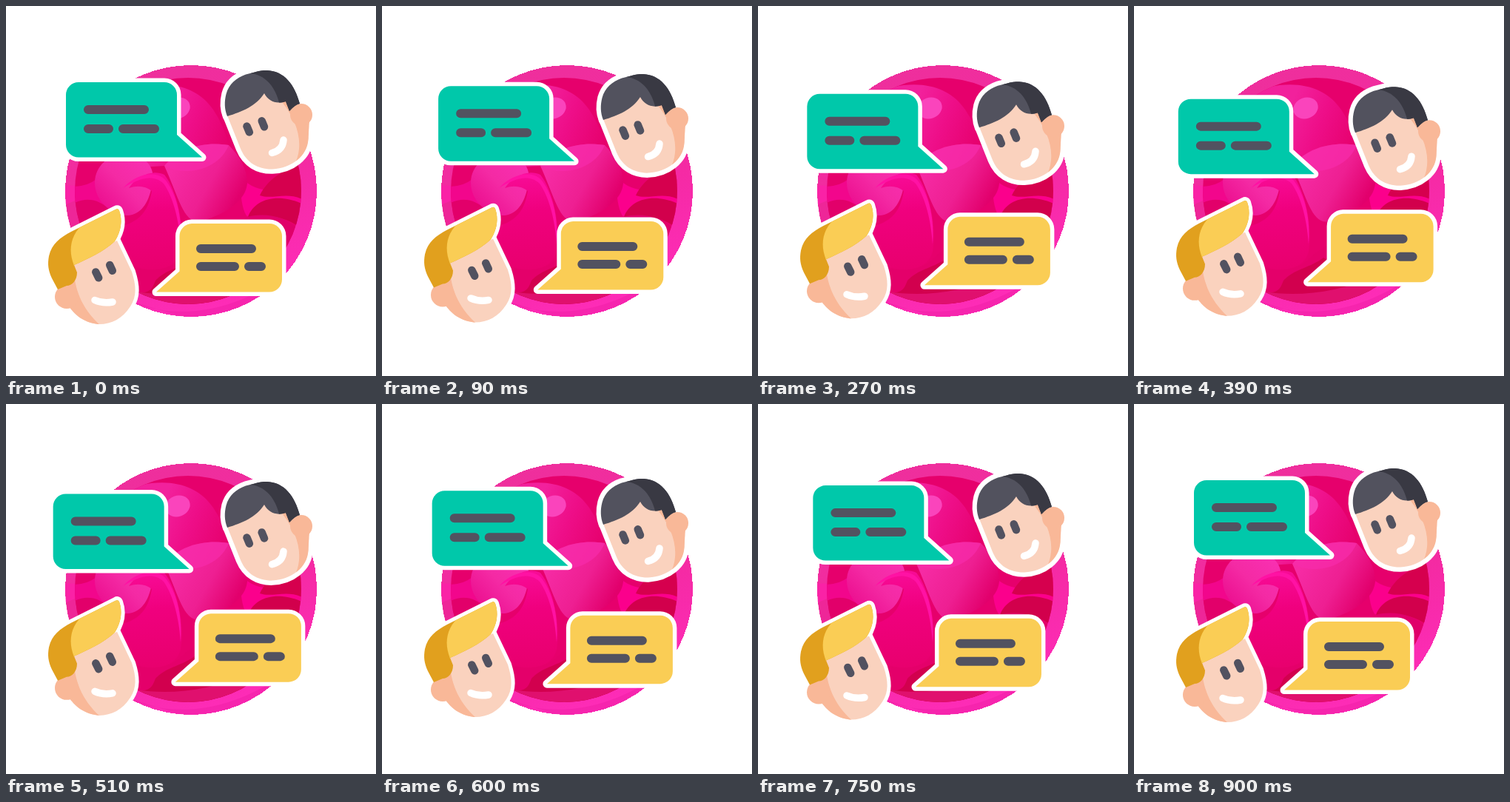
These frames come from a looping animation (500 px wide and 500 px high, 930 ms). An HTML page:

```html
<!DOCTYPE html>
<html lang="en">
<head>
<meta charset="utf-8">
<title>Chat</title>
<style>
  html, body { margin: 0; width: 100%; height: 100%; overflow: hidden; background: #fff; }
  svg { display: block; width: 100%; height: 100%; }
  .rim { fill: #fff; stroke: #fff; stroke-width: 11; stroke-linejoin: round; }
  .bubble { stroke: #fff; stroke-width: 11; stroke-linejoin: round; paint-order: stroke; }
  .line { fill: none; stroke: #525260; stroke-width: 12; stroke-linecap: round; }
  .eye { fill: none; stroke: #525260; stroke-width: 10.5; stroke-linecap: round; }
  .smile { fill: none; stroke: #fff; stroke-width: 9.5; stroke-linecap: round; }
  .skin { fill: #fad2be; }
  .shade { fill: #f9b898; }
  #dark .rim { stroke-width: 12.5; }
  #fair .rim { stroke-width: 10; }
</style>
</head>
<body>
<svg viewBox="0 0 500 500">
  <defs>
    <linearGradient id="ring" x1="0.3" y1="0" x2="0.7" y2="1">
      <stop offset="0" stop-color="#ee2f9c"/>
      <stop offset="0.55" stop-color="#f42aa2"/>
      <stop offset="1" stop-color="#ff2cba"/>
    </linearGradient>
    <linearGradient id="sky" gradientUnits="userSpaceOnUse" x1="205" y1="150" x2="300" y2="190">
      <stop offset="0" stop-color="#f2219c"/>
      <stop offset="0.45" stop-color="#ee0e88"/>
      <stop offset="1" stop-color="#e6006c"/>
    </linearGradient>
    <linearGradient id="lens" gradientUnits="userSpaceOnUse" x1="228" y1="215" x2="312" y2="262">
      <stop offset="0" stop-color="#f62ba4"/>
      <stop offset="0.55" stop-color="#ee1f92"/>
      <stop offset="1" stop-color="#e2006c"/>
    </linearGradient>
    <linearGradient id="drop" x1="0.2" y1="0.9" x2="0.9" y2="0.2">
      <stop offset="0" stop-color="#ec1090"/>
      <stop offset="0.5" stop-color="#f42aa4"/>
      <stop offset="1" stop-color="#f82fb0"/>
    </linearGradient>
    <linearGradient id="ribbon" gradientUnits="userSpaceOnUse" x1="190" y1="225" x2="200" y2="355">
      <stop offset="0" stop-color="#f80c98"/>
      <stop offset="0.4" stop-color="#f0007e"/>
      <stop offset="1" stop-color="#e8006e"/>
    </linearGradient>
    <clipPath id="inDisc"><circle cx="250" cy="250" r="170"/></clipPath>
    <clipPath id="inCore"><circle cx="246" cy="250" r="153"/></clipPath>
    <path id="darkFace" d="M299 148 L317 193 C325 212 341 221 360 220.500 C386 219 407 203 408.500 180 L410 150 L384 124 L349 116 Z"/>
    <path id="darkHair" d="M299 149 C295 139 295 129 297.500 119 C301 106 311 97 324 92.500 L336 89.500 C342 87.500 347 87 353 87 C376 88 390 106 397 132 Q391 133 383 142 L378 129 C365 133 355 129 349 118 C338 135 319 143 299 149 Z"/>
    <path id="fairFace" d="M92 346 L150 317 L170 359 C176 378 177 392 168 406 C157 423 142 430.500 124 430 C102 427 91 415 83 403 L78 380 Z"/>
    <path id="fairHair" d="M70 383 L62 368 C57 357 56 349 58 338 C62 321 73 313 88 305 L148 275 Q151.500 273 153 276.500 C157.500 289 156 304 147 318 C132 332 110 342 92 350 L96 360 C96 371 89 378 82 378 Z"/>
    <clipPath id="inDarkFace"><use href="#darkFace"/></clipPath>
    <clipPath id="inDarkHair"><use href="#darkHair"/></clipPath>
    <clipPath id="inFairFace"><use href="#fairFace"/></clipPath>
    <clipPath id="inFairHair"><use href="#fairHair"/></clipPath>
  </defs>

  <circle cx="250" cy="250" r="170" fill="url(#ring)" shape-rendering="crispEdges"/>
  <g clip-path="url(#inDisc)">
    <path d="M78 243 C100 241 115 246 135 236 V263 C112 256 95 261 78 270 Z" fill="#fa22a6"/>
    <path d="M78 270 C95 260 112 258 135 264 V300 H78 Z" fill="#ee2698"/>
    <path d="M160 396 C220 424 300 420 380 362 L350 400 L250 424 Z" fill="#f01ea6" opacity=".5"/>
  </g>

  <circle cx="246" cy="250" r="153" fill="#e6006c"/>
  <g clip-path="url(#inCore)">
    <path d="M93 244 Q111 243 122 234 L142 274 Q115 257 93 266 Z" fill="#f2068c"/>
    <path d="M93 266 C110 258 126 262 138 274 C152 290 166 310 172 345 L150 380 L90 330 Z" fill="#e2006a"/>
    <path d="M318 232 C340 256 372 250 402 240 V286 C372 262 345 266 327 286 C318 276 316 250 318 232 Z" fill="#fb008c"/>
    <path d="M343 256 C352 236 374 220 402 214 V262 C380 250 360 262 343 256 Z" fill="#d6004e"/>
    <path d="M327 285 C336 260 368 252 402 268 L398 300 C375 282 348 282 327 285 Z" fill="#d2004c"/>
    <path d="M327 285 C350 279 378 284 396 303 L370 362 Q352 320 327 285 Z" fill="#e0006a"/>
    <path d="M150 120 C207 96 255 104 280 140 Q295 162 301 188 C270 183 236 190 214 216 L150 220 Z" fill="url(#sky)"/>
    <path d="M214 216 C236 190 270 183 301 188 C316 203 326 220 326 240 C324 262 300 280 264 291 C241 296 235 263 214 216 Z" fill="url(#lens)"/>
    <path d="M214 216 C235 190 270 183 301 188 C292 211 267 224 240 223 Q226 222 214 216 Z" fill="#f82cac" opacity=".7"/>
    <path d="M120 238 C121 212 145 196 170 202 C195 205 204 225 196 248 C190 275 174 287 155 282 C133 275 120 258 120 238 Z" fill="url(#drop)"/>
    <path d="M166 246 C176 230 198 220 214 228 C232 250 242 300 236 332 C230 354 205 360 177 353 C160 345 149 326 141 300 C178 296 192 280 197 250 Q184 240 166 246 Z" fill="url(#ribbon)"/>
    <path d="M158 246 C176 226 207 219 219 240 C235 264 238 298 236 322 C234 290 226 258 213 240 C198 226 178 234 158 246 Z" fill="#ff12a4"/>
    <path d="M170 352 C196 361 222 357 238 340 C260 319 291 312 327 284 C333 316 316 340 282 357 C248 373 217 380 180 388 Z" fill="#e4006a"/>
    <path d="M176 387 C202 390 198 373 204 369 C220 354 238 354 256 340 L334 390 Q250 420 176 387 Z" fill="#d2004e"/>
    <path d="M175 386 C225 394 277 386 326 366 L370 350 L310 404 H200 Z" fill="#e0106e"/>
    <ellipse cx="232" cy="138" rx="17" ry="14" transform="rotate(-20 232 138)" fill="#fa44bc"/>
  </g>

  <g id="green">
    <path class="bubble" fill="#00c8aa" d="M98 103 H214 A17 17 0 0 1 231 120 V174 L265 204.500 H98 A17 17 0 0 1 81 187.500 V120 A17 17 0 0 1 98 103 Z"/>
    <path class="line" d="M111 140 H187 M111 166 H139 M158 166 H201"/>
  </g>

  <g id="dark">
    <use href="#darkFace" class="rim"/>
    <use href="#darkHair" class="rim"/>
    <use href="#darkFace" class="skin"/>
    <path class="shade" clip-path="url(#inDarkFace)" d="M368 124 C389 147 398 172 396 193 Q395 206 388 217 H430 V120 Z"/>
    <circle class="shade" cx="399" cy="147" r="15"/>
    <use href="#darkHair" fill="#52525e"/>
    <path clip-path="url(#inDarkHair)" fill="#393943" d="M330 91 C350 93 364 108 370 134 L383 146 L405 138 V80 H330 Z"/>
    <path class="eye" d="M325.500 162.500 L328.800 170.500 M345.700 155.300 L349 163.300"/>
    <path class="smile" d="M359.500 198.500 Q374 195 375 181"/>
  </g>

  <g id="fair">
    <use href="#fairFace" class="rim"/>
    <use href="#fairHair" class="rim"/>
    <use href="#fairFace" class="skin"/>
    <path class="shade" clip-path="url(#inFairFace)" d="M92 346 C90 378 101 408 128 432 H70 V346 Z"/>
    <circle class="shade" cx="82" cy="393" r="16"/>
    <use href="#fairHair" fill="#e1a01e"/>
    <path clip-path="url(#inFairHair)" fill="#facd55" d="M106 293 C88 308 83 328 92 351 L165 330 V260 Z"/>
    <path class="eye" d="M121.300 359.500 L125.200 367.300 M140.200 350 L143.800 357.800"/>
    <path class="smile" d="M120 397.500 Q131 402.500 144 400"/>
  </g>

  <g id="yellow">
    <path class="bubble" fill="#facd55" d="M251 294 H356 A17 17 0 0 1 373 311 V369.500 A17 17 0 0 1 356 386.500 H203 L234.500 358.500 V311 A17 17 0 0 1 251 294 Z"/>
    <path class="line" d="M263 328 H332 M263 352 H309 M328 352 H345"/>
  </g>
</svg>
<script>
  const LOOP = 930, STEP = 30, TURN = 405, END = 900;

  // Farthest offset of each part at the turning point.
  const reach = { green: [-22, 23.5], dark: [0, 23], fair: [0, -11.6], yellow: [32.8, -13.8] };
  const parts = Object.entries(reach).map(([id, to]) => [document.getElementById(id), to]);

  function draw() {
    const t = Math.floor(performance.now() % LOOP / STEP) * STEP;
    const k = t < TURN ? t / TURN : (END - t) / (END - TURN);
    for (const [el, [x, y]] of parts) {
      el.setAttribute('transform', `translate(${(x * k).toFixed(2)} ${(y * k).toFixed(2)})`);
    }
    requestAnimationFrame(draw);
  }
  draw();
</script>
</body>
</html>
```
